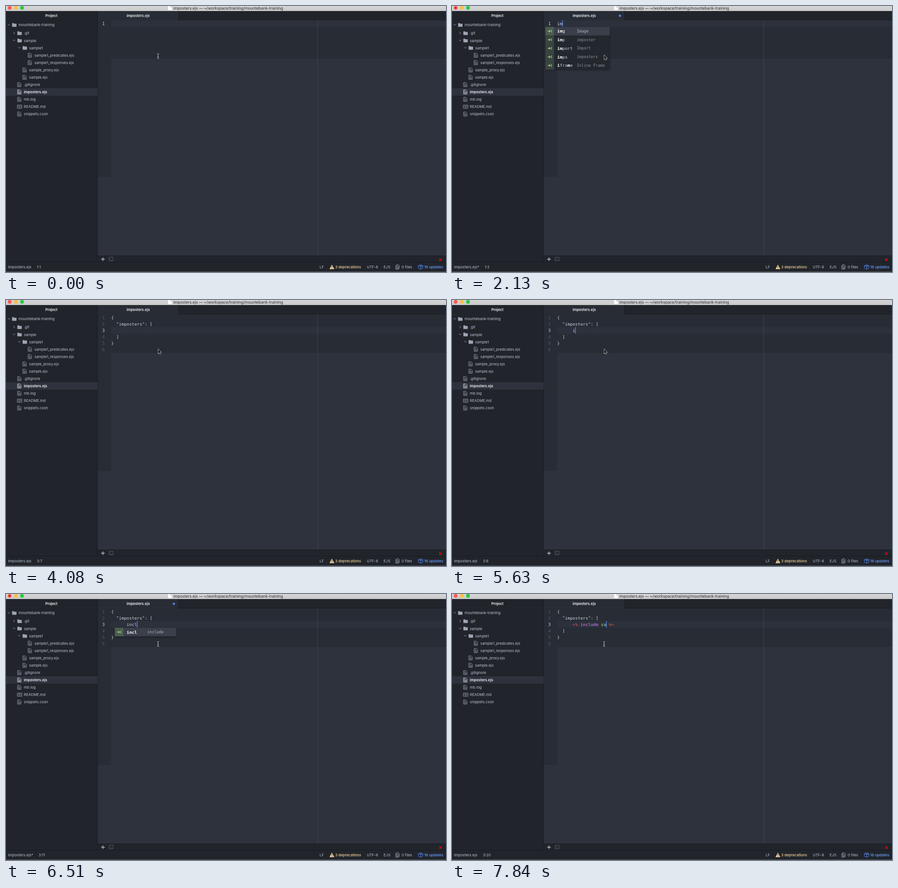
Write an HTML page with a canvas that moves like this. It is 962 px wide and 582 px high and loops after 7990 ms.

```html
<!DOCTYPE html>
<html lang="en">
<head>
<meta charset="utf-8">
<title>Editor snippets</title>
<style>
html, body { margin: 0; width: 100%; height: 100%; overflow: hidden; background: #21252b; }
canvas { display: block; }
</style>
</head>
<body>
<canvas id="stage" width="962" height="582"></canvas>
<script>
const LOOP = 7990;
const g = document.getElementById('stage').getContext('2d');
const UI = 'Inter, "Open Sans", sans-serif';
const MONO = '"DejaVu Sans Mono", "Liberation Mono", monospace';
const CHAR = 5.635, LINE = 14.05, CODE_X = 230;
const DARK = '#21252b', EDITOR = '#282c34', PALE = '#2e323c', EDGE = '#181a1f';
const GREY = '#bcc3d0', CODE = '#ccd2dc', WHITE = '#f4f6fa', ICON = '#9da5b4';
const BLUE = '#568af2', LINK = '#6c9dff', AMBER = '#f6d49c', GREEN = '#98c379';

// Times at which a two-state thing flips, starting from off
const CARET = [150, 510, 950, 1250, 1690, 3030, 3480, 4080, 4440, 4880, 5180, 7110, 7550];
const DIRTY = [2130, 4080, 6510, 7250];
const ARROW = [2130, 2430, 4080, 6080];
const EXPANDED = 3480, INCLUDED = 6660;
const TYPED = [
  [0, ''], [1690, 'i'], [1840, 'im'], [2430, 'imp'], [2580, 'imps'], [EXPANDED, ''],
  [5630, 'i'], [5780, 'in'], [6080, 'inc'], [6220, 'incl'],
  [INCLUDED, '<% include '], [7690, '<% include s'], [7840, '<% include sa']
];
const IMP = ['imp', 'imposter'], IMPORT = ['import', 'Import'], IMPS = ['imps', 'imposters'];
const INCL = ['incl', 'include'];
const POPUPS = [
  [0, null],
  [1990, { width: 141, desc: 69, rows: [['img', 'Image'], IMP, IMPORT, IMPS, ['iframe', 'Inline Frame']] }],
  [2430, { width: 134.5, desc: 72, rows: [IMP, IMPORT, IMPS] }],
  [2580, { width: 134.5, desc: 64.5, rows: [IMPS] }],
  [EXPANDED, null],
  [5930, { width: 147, desc: 69, rows: [INCL, ['ins', 'Inserted Text'], ['input', 'Input']] }],
  [6080, { width: 134.5, desc: 71, rows: [INCL] }],
  [INCLUDED, null]
];
// indent level, kind, name
const TREE = [
  [0, 'open', 'mountebank-training'], [1, 'closed', '.git'], [1, 'open', 'sample'],
  [2, 'open', 'sample1'], [3, 'file', 'sample1_predicates.ejs'], [3, 'file', 'sample1_responses.ejs'],
  [2, 'file', 'sample_proxy.ejs'], [2, 'file', 'sample.ejs'], [1, 'file', '.gitignore'],
  [1, 'file', 'imposters.ejs'], [1, 'file', 'mb.log'], [1, 'book', 'README.md'], [1, 'file', 'snippets.cson']
];

const isOn = (flips, t) => flips.filter(f => f <= t).length % 2 === 1;
const at = (list, t) => list.filter(e => e[0] <= t).pop()[1];

function rect(x, y, w, h, color) {
  g.fillStyle = color;
  g.fillRect(x, y, w, h);
}
function dot(x, y, r, color) {
  g.fillStyle = color;
  g.beginPath();
  g.arc(x, y, r, 0, 7);
  g.fill();
}
function path(d, color, width) {
  const p = new Path2D(d);
  if (width) {
    g.strokeStyle = color;
    g.lineWidth = width;
    g.stroke(p);
  } else {
    g.fillStyle = color;
    g.fill(p);
  }
}
// y is the middle of the capitals
function text(s, x, y, color, style = '', size = 8, family = UI) {
  g.font = `${style} ${size}px ${family}`;
  g.fillStyle = color;
  g.fillText(s, x, y + size * 0.365);
}
const code = (s, x, y, color, style) => text(s, x, y, color, style, 9.36, MONO);
const lineY = n => 38.1 + (n - 1) * LINE;
function moved(x, y, draw) {
  g.save();
  g.translate(x, y);
  draw();
  g.restore();
}

function titleBar(dirty) {
  const shade = g.createLinearGradient(0, 0, 0, 11);
  shade.addColorStop(0, '#d6d6d6');
  shade.addColorStop(1, '#cacaca');
  rect(0, 0, 962, 11, shade);
  dot(8, 4, 4.2, '#fc5b57');
  dot(21.5, 4, 4.2, '#fdbe41');
  dot(35, 4, 4.2, '#2ac940');
  if (dirty) dot(8, 4, 1.5, '#7e0508');
  path('M354.5 0h5l3 3v6h-8z', '#fff');
  path('M359.5 0v3h3', '#aaa', 0.6);
  text('imposters.ejs — ~/workspace/training/mountebank-training', 366, 4.7, '#2c2c2c', '', 8.5);
}

function treeRow([level, kind, name], i) {
  const x = 13.3 + level * 11.5;
  const y = i ? 59.5 + (i - 1) * 16.08 : 41.5;
  const chosen = name === 'imposters.ejs';
  const color = chosen ? WHITE : ICON;
  if (chosen) rect(0, 180, 200, 16, '#2e323d');
  moved(x, y, () => {
    if (kind === 'file') {
      path('M.5 -4.5h5l2.5 2.5v6.5h-7.5z', color, 0.9);
      path('M2 -1.8h2.5M2 .4h4.5M2 2.4h4.5', color, 0.9);
    } else if (kind === 'book') {
      path('M0 -3.5h4.5l.5 .7l.5 -.7h4.5v7h-4.5l-.5 .6l-.5 -.6h-4.5zM5 -3v6.5', color, 0.9);
      path('M1.5 -1.3h2M1.5 .5h2M6.5 -1.3h2M6.5 .5h2', color, 0.8);
    } else {
      path('M0 -3.2q0 -.8 .8 -.8h2.7q.8 0 .8 1.2h4.6q.8 0 .8 .8v5.2q0 .8 -.8 .8h-8.1q-.8 0 -.8 -.8z', color);
      path(kind === 'open' ? 'M-9.6 -1.6l2.4 2.3l2.4 -2.3' : 'M-8.4 -2.8l2.4 2.4l-2.4 2.4', color, 1);
    }
  });
  text(name, x + 14.2, y, chosen ? WHITE : GREY, chosen ? '600' : '', chosen ? 7.8 : 8);
}

function frame(t, dirty) {
  rect(0, 0, 962, 582, DARK);
  rect(200, 31, 762, 515, EDITOR);
  rect(230, 116, 732, 430, PALE);
  rect(200, 374, 30, 172, PALE);
  rect(200, 11, 177, 20, EDITOR);
  rect(377, 11, 1, 20, EDGE);
  rect(377, 30.5, 585, 1, EDGE);
  rect(199.5, 11, 1, 549, EDGE);
  titleBar(dirty);
  text('Project', 86, 21.3, WHITE, '600', 7.75);
  TREE.forEach(treeRow);
  text('imposters.ejs', 263.7, 21.3, WHITE, t < DIRTY[0] ? 'italic 600' : '600', 7.75);
  if (dirty) dot(367, 21.5, 2.4, BLUE);
}

function statusBar(dirty, place) {
  rect(200, 546, 762, 1, EDGE);
  rect(0, 560, 962, 1, EDGE);
  rect(0, 581, 962, 1, '#5a5d62');
  path('M208 554h8M212 550v8', '#c0c4cc', 1.3);
  path('M225.5 549.5h8.5v8h-8.5z', '#5a616d', 0.9);
  path('M227 551.8l1.7 1.6l-1.7 1.6M229.5 555.5h2.5', '#5a616d', 0.8);
  path('M947 552.2l5.6 5.6M952.6 552.2l-5.6 5.6', '#f00', 1.5);

  const y = 571.3;
  text(dirty ? 'imposters.ejs*' : 'imposters.ejs', 4.5, y, GREY, '', 8.1);
  text(place, dirty ? 71.3 : 67.5, y, GREY);
  text('LF', 685.8, y, GREY);
  path('M712.5 566l5.2 9.7h-10.4z', AMBER);
  path('M712.5 569v3.2M712.5 573.2v1.2', DARK, 1.1);
  text('3 deprecations', 719.8, y, AMBER, '500', 7.9);
  text('UTF-8', 789, y, GREY);
  text('EJS', 825.8, y, GREY);
  path('M854 566h4l2 2v6h-6zM854 568h-2v8h6v-2M857 568.5v3M855.5 570h3M855.5 572.8h3', ICON, 0.9);
  text('0 files', 865, y, GREY);
  path('M901.5 568.2l5 -2l5 2v5.5l-5 2.2l-5 -2.2zM901.5 568.2l5 2l5 -2M906.5 570.2v5.5M904 567.2l5 2v2', BLUE, 0.9);
  text('16 updates', 914.3, y, LINK, '500', 8.1);
}

function editor(t, typed, caret) {
  const row = t < EXPANDED ? 1 : 3;
  const col = row === 1 ? 0 : 6;
  const x = CODE_X + col * CHAR;
  const top = lineY(row) - 6.8;
  rect(CODE_X, top, 732, LINE, '#2c313c');
  rect(681, 31, 1, 515, '#3f444d');
  for (let n = 1; n <= (row === 1 ? 1 : 6); n++) {
    code(n, 210.3, lineY(n), n === row ? CODE : '#525968');
  }
  if (row === 3) {
    ['{', '  "imposters": [', '', '  ]', '}'].forEach((s, i) => code(s, CODE_X, lineY(i + 1), CODE));
  }
  if (t < INCLUDED) {
    code(typed, x, lineY(row), CODE);
  } else {
    const red = '#e8513c';
    code('<%', x, lineY(3), red);
    code('include', x + 3 * CHAR, lineY(3), '#e184f8');
    code(typed.slice(11), x + 11 * CHAR, lineY(3), '#a9db85');
    code('%>', x + (typed.length + 1) * CHAR, lineY(3), red);
  }
  if (caret) rect(x + typed.length * CHAR - 0.3, top, 1.4, LINE, '#528bff');
  return { row, x };
}

function popup({ width, desc, rows }, typed, x, y) {
  const h = 18.75;
  g.save();
  g.shadowColor = 'rgba(0,0,0,.4)';
  g.shadowBlur = 4;
  g.shadowOffsetY = 1;
  rect(x, y, width, rows.length * h, '#23272e');
  g.restore();
  rows.forEach(([word, note], i) => {
    const top = y + i * h, mid = top + h / 2;
    if (!i) rect(x, top, width, h, '#3a3f4a');
    rect(x, top, 19, h, i ? '#39443f' : '#4c5c50');
    path(`M${x + 5} ${mid}h6M${x + 13.4} ${mid - 3}v6`, GREEN, 1.4);
    path(`M${x + 8} ${mid - 2.8}l4 2.8l-4 2.8z`, GREEN);
    let hit = 0;
    [...word].forEach((c, k) => {
      const match = c === typed[hit];
      if (match) hit++;
      code(c, x + 26 + k * CHAR, mid, match ? '#fff' : i ? CODE : WHITE, match ? 'bold' : '');
    });
    text(note, x + desc, mid - 0.2, i ? '#8b919d' : '#b2b8c4', '', 8.48, MONO);
  });
}

function pointer(arrow) {
  if (arrow) {
    const d = 'M333 107.8v9l2 -1.9l1.5 3.4l1.3 -.6l-1.5 -3.3h2.7z';
    path(d, '#e8e8e8', 1.2);
    path(d, '#111');
  } else {
    path('M330.3 104.3q2.2 0 2.2 1.4v7.6q0 1.4 -2.2 1.4M334.7 104.3q-2.2 0 -2.2 1.4M334.7 114.7q-2.2 0 -2.2 -1.4M331.2 111h2.6', '#d8d8d8', 0.9);
  }
}

function draw(t) {
  const typed = at(TYPED, t), dirty = isOn(DIRTY, t), menu = at(POPUPS, t);
  frame(t, dirty);
  const { row, x } = editor(t, typed, isOn(CARET, t));
  if (menu) popup(menu, typed, x - 26, lineY(row) + 7.6);
  statusBar(dirty, `${row}:${typed.length + (row === 1 ? 1 : 7)}`);
  pointer(isOn(ARROW, t));
}

const start = performance.now();
function tick() {
  draw((performance.now() - start) % LOOP);
  requestAnimationFrame(tick);
}
tick();
</script>
</body>
</html>
```
